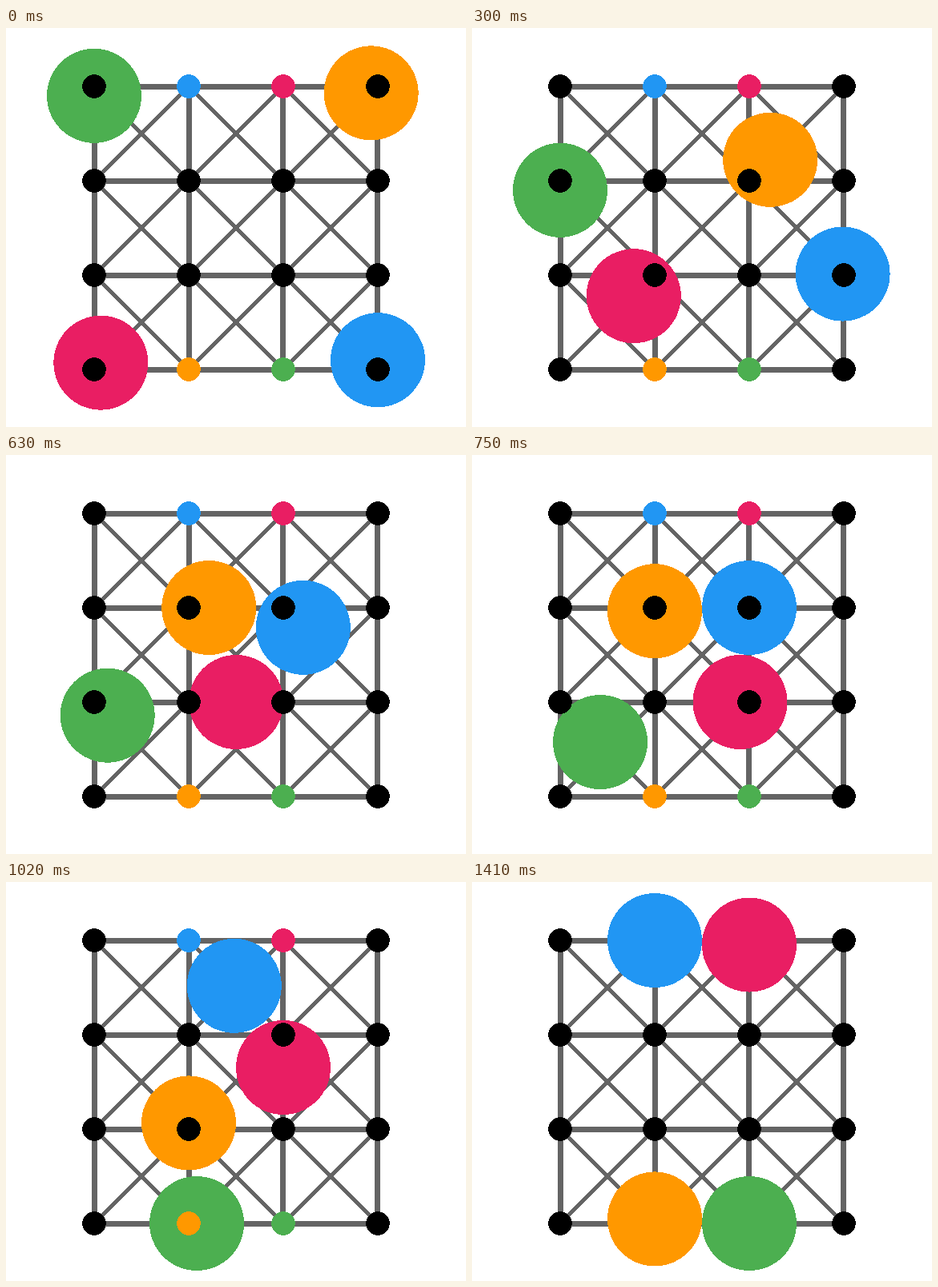
Animation, 574 px wide and 499 px high, one loop 1.44 s. Source, as an HTML page:

```html
<!DOCTYPE html>
<html lang="en">
<head>
<meta charset="utf-8">
<title>Grid agents</title>
<style>
  html, body { margin: 0; width: 100%; height: 100%; overflow: hidden; background: #fff; }
  svg { display: block; width: 574px; height: 499px; shape-rendering: crispEdges; }
  line { stroke: #646464; stroke-width: 7; }
  line.diag { stroke-width: 5; }
</style>
</head>
<body>
<svg viewBox="0 0 574 499">
  <g id="edges"></g>
  <g id="agents"></g>
  <g id="nodes"></g>
</svg>
<script>
const SIZE = 4, CELL = 118, LEFT = 110, TOP = 73;
const STEP_MS = 30, STEPS = 48, STEPS_PER_CELL = 10;
const X = c => LEFT + c * CELL;
const Y = r => TOP + r * CELL;

// Routes list compass moves; a number is a wait, in cell-crossing times.
const agents = [
  { color: '#4caf50', start: [0, 0], route: 'S S SE E' },
  { color: '#ff9800', start: [3, 0], route: 'SW W 0.15 S 0.283 S' },
  { color: '#e91e63', start: [0, 3], route: 'NE 0.283 E 0.15 N N' },
  { color: '#2196f3', start: [3, 3], route: 'N 0.083 NW 0.269 NW' }
];

function add(parent, tag, attrs) {
  const el = document.createElementNS('http://www.w3.org/2000/svg', tag);
  for (const name in attrs) el.setAttribute(name, attrs[name]);
  return document.getElementById(parent).appendChild(el);
}

// Turns a route into legs that run at constant speed.
function plan(agent) {
  let [c, r] = agent.start, time = 0;
  agent.legs = [];
  for (const word of agent.route.split(' ')) {
    if (+word) {
      time += +word;
      continue;
    }
    const dc = word.includes('E') - word.includes('W');
    const dr = word.includes('S') - word.includes('N');
    const length = Math.hypot(dc, dr);
    agent.legs.push({ c, r, dc, dr, time, length });
    c += dc;
    r += dr;
    time += length;
  }
  agent.goal = [c, r];
}

function edge(c, r, dc, dr) {
  const c2 = c + dc, r2 = r + dr;
  if (c2 < 0 || c2 >= SIZE || r2 >= SIZE) return;
  const diag = dc && dr;
  // Straight lines sit on whole pixels, on a slightly narrower pitch.
  const lineX = col => X(col) + (diag ? 0 : 0.5 - 0.3 * col);
  const lineY = row => Y(row) + (diag ? 0 : 0.5);
  add('edges', 'line', {
    x1: lineX(c), y1: lineY(r), x2: lineX(c2), y2: lineY(r2),
    class: diag ? 'diag' : 'straight'
  });
}

function nodeColor(c, r) {
  const owner = agents.find(({ goal }) => goal[0] === c && goal[1] === r);
  return owner ? owner.color : '#000';
}

agents.forEach(plan);
for (let r = 0; r < SIZE; r++) {
  for (let c = 0; c < SIZE; c++) {
    for (const [dc, dr] of [[1, 0], [0, 1], [1, 1], [-1, 1]]) edge(c, r, dc, dr);
    add('nodes', 'circle', { cx: X(c), cy: Y(r), r: CELL / 8, fill: nodeColor(c, r) });
  }
}
for (const a of agents) a.el = add('agents', 'circle', { r: CELL / 2, fill: a.color });

function place({ el, legs }, time) {
  const leg = legs.filter(l => l.time <= time).pop();
  const p = Math.min(1, (time - leg.time) / leg.length);
  el.setAttribute('cx', X(leg.c + leg.dc * p));
  el.setAttribute('cy', Y(leg.r + leg.dr * p));
}

let origin;
function draw(now) {
  origin ??= now;
  const step = Math.floor(Math.max(0, now - origin) / STEP_MS) % STEPS;
  for (const a of agents) place(a, (step + 1) / STEPS_PER_CELL);
  requestAnimationFrame(draw);
}
requestAnimationFrame(draw);
</script>
</body>
</html>
```
